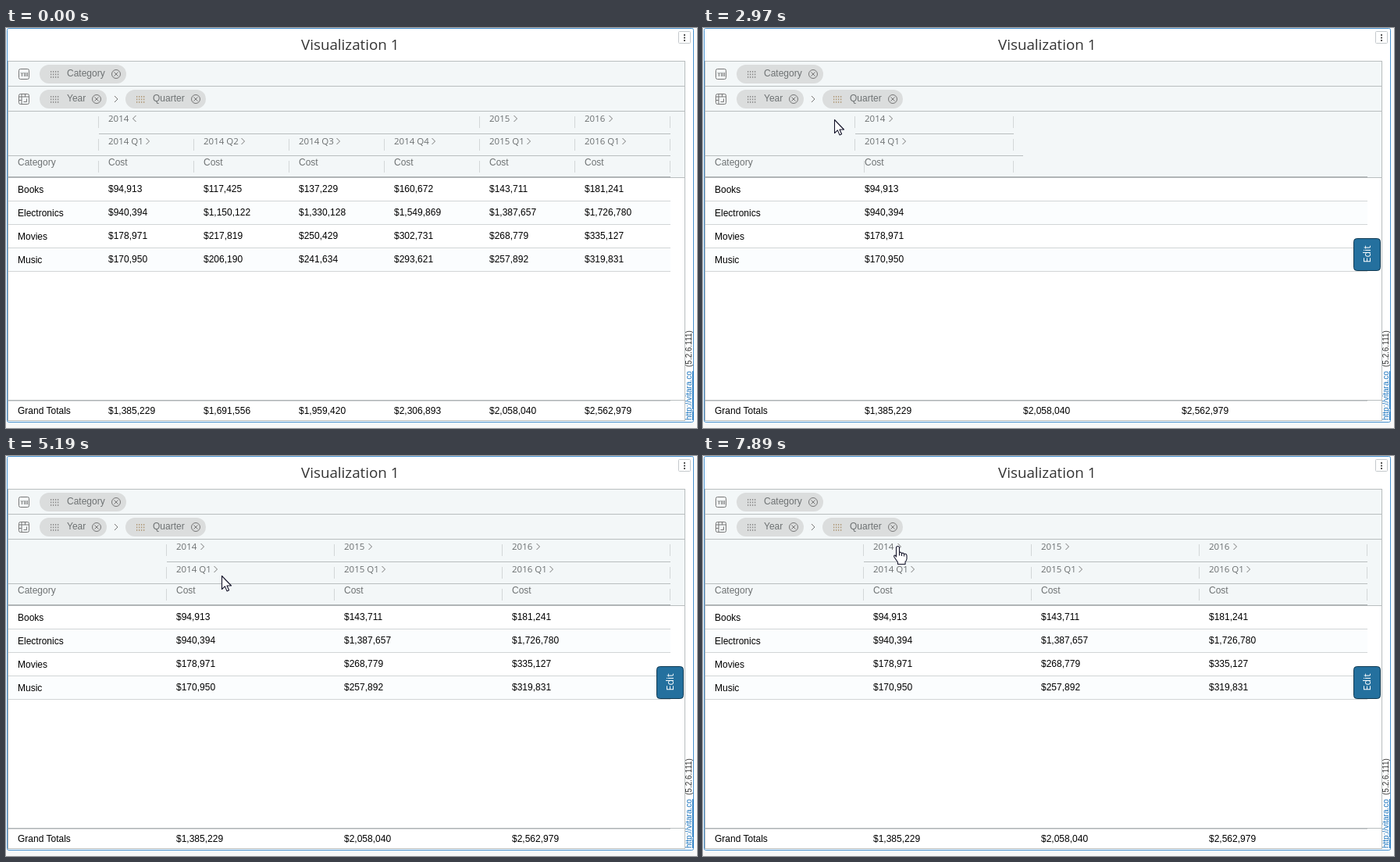
An HTML page for the animation above (8000 ms loop, 885 px wide and 512 px high).

```html
<!DOCTYPE html>
<html lang="en">
<head>
<meta charset="utf-8">
<title>Visualization 1</title>
<style>
html, body { margin: 0; width: 100%; height: 100%; overflow: hidden; background: #fff; }
svg { display: block; width: 100%; height: 100%; }
text { font: 12px "Liberation Sans", Arial, sans-serif; fill: #000; white-space: pre; }
.gray { fill: #6e7273; }
.head { font: 11.5px "Open Sans", sans-serif; fill: #6b6f70; }
.title { font: 18.8px "Open Sans", sans-serif; fill: #333; }
.side { font-size: 10px; fill: #333; }
.edit { font: 12.5px "Open Sans", sans-serif; fill: #fff; }
.ico { fill: none; stroke: #777; }
</style>
</head>
<body>
<svg viewBox="0 0 885 512">
  <defs><clipPath id="view"><path d="M3 107H851V503H3z"/></clipPath></defs>
  <g id="frame"></g>
  <g id="grid" clip-path="url(#view)"></g>
  <g id="edit">
    <rect x="833.5" y="269.5" width="34" height="41" rx="4" fill="#24709e" stroke="#123a52"/>
    <text class="edit" transform="translate(854.5 300.5) rotate(-90)">Edit</text>
  </g>
  <circle id="ring" r="12" fill="#ffdc00" fill-opacity=".47"/>
  <path id="cursor" fill="#fff" stroke="#14142a" stroke-width="1.1" stroke-linejoin="round"/>
</svg>
<script>
const LOOP = 8000;
const LINE = '#b9bebf', STRONG = '#adb2b4';
const ROW_H = 30, BODY = 192, RIGHT = 851;
const $ = id => document.getElementById(id);

const COSTS = {
  'Books': [94913.3, 117425, 137229, 160672, 143711.3, 181241],
  'Electronics': [940394.3, 1150122, 1330128, 1549869, 1387657.3, 1726780],
  'Movies': [178971, 217819, 250429, 302731, 268779, 335127],
  'Music': [170950, 206190, 241634, 293621, 257892, 319831]
};
const NAMES = Object.keys(COSTS);
const money = v => '$' + Math.round(v).toLocaleString('en-US');
const COLS = Array.from({ length: 6 }, (_, i) => {
  const costs = NAMES.map(n => COSTS[n][i]);
  return {
    year: 2014 + Math.max(0, i - 3),
    quarter: i < 4 ? i + 1 : 1,
    costs: costs.map(money),
    total: money(costs.reduce((a, b) => a + b))
  };
});
const FIRSTS = COLS.filter(c => c.quarter === 1);

const text = (x, y, s, cls = '') => `<text x="${x}" y="${y}" class="${cls}">${s}</text>`;
const rect = (x, y, w, h, fill, more = '') =>
  `<rect x="${x}" y="${y}" width="${w}" height="${h}" fill="${fill}" ${more}/>`;
const hline = (x1, x2, y, color = LINE) => rect(x1, y, x2 - x1, 1, color);
const vline = (x, y1, y2, color = LINE) => rect(x, y1, 1, y2 - y1, color);
const tick = (x, y) => vline(x, y, y + 15, '#d3d7d8');
const icon = d => `<path class="ico" d="${d}"/>`;
const chevron = (x, y, dir = 1) => icon(`M${x - 2 * dir} ${y - 4}l${4 * dir} 4l${-4 * dir} 4`);

function chip(x, y, w, label, dotColor = '#8a8a8a') {
  const cx = x + w - 13, cy = y + 12;
  let s = rect(x, y, w, 24, '#dbdddd', 'rx="12"');
  for (let i = 0; i < 12; i++)
    s += rect(x + 14 + i % 4 * 3, y + 8 + (i >> 2) * 3.5, 1.3, 1.8, dotColor);
  return s + text(x + 35, y + 15, label, 'gray') +
    `<circle class="ico" cx="${cx}" cy="${cy}" r="5.5"/>` +
    icon(`M${cx - 2.5} ${cy - 2.5}l5 5m0-5l-5 5`);
}

function drawFrame() {
  let s = rect(0, 505, 885, 7, '#f8f8f8') + rect(881, 0, 4, 512, '#fafafa') +
    rect(1.5, .5, 879, 504, '#fff', 'rx="2" stroke="#4590cf"') +
    rect(3, 43, 866, 148, '#f3f7f8') +
    vline(2, 42, 503, '#a5a9ab') + vline(869, 42, 503);
  for (const y of [42, 74, 106, 191, 476, 502]) s += hline(3, 870, y);
  s += text(378, 28, 'Visualization 1', 'title') +
    rect(861.5, 4.5, 15, 15, '#fff', 'stroke="#c4c9cc" rx="1"');
  for (let i = 0; i < 3; i++) s += rect(868, 8 + i * 3.5, 2, 2, '#555');
  s += chip(43, 47, 111, 'Category') + chip(43, 79, 86, 'Year') +
    chip(153, 79, 103, 'Quarter', '#b09a78') + chevron(141, 91);
  for (const y of [52.5, 84.5])
    s += rect(16.5, y, 13, 13, 'none', 'class="ico" rx="2"');
  s += icon('M19 57l1.5 2 1.5-2m-1.5 2v3M23.5 57v5m2-5v5m2-5v5') +
    icon('M20 84.5v13M16.5 88h13M24.5 84.5V88M16.5 92.5H20M22.5 94.5h4v-4');
  return s + '<g transform="translate(878 502) rotate(-90)">' +
    '<text class="side"><tspan fill="#1b74bd" text-decoration="underline">http://vitara.co</tspan></text>' +
    text(68, 0, '(5.2.6.111)', 'side') + '</g>';
}

// gap: how far the later columns still have to slide, or null at rest
function drawGrid(cols, left, width, open, gap, hover) {
  const moving = gap !== null;
  const totalY = 494;
  let s = text(15, 176, 'Category', 'gray') + text(15, totalY, 'Grand Totals');
  NAMES.forEach((name, i) => {
    const y = BODY + i * ROW_H;
    const fill = i === hover ? '#ebeff0' : i % 2 ? '#fbfdfe' : '#fff';
    s += rect(3, y, RIGHT - 3, ROW_H - 1, fill) +
      hline(3, RIGHT, y + ROW_H - 1, '#d2d5d6') + text(15, y + 19, name);
  });

  cols.forEach((c, i) => {
    const rest = left + i * width;
    const x = rest + (i ? gap || 0 : 0);
    const tx = x + 12;
    if (!open || c.quarter === 1)
      s += text(tx, 120, c.year, 'head') + chevron(tx + 33.5, 116, open && !i ? -1 : 1) + tick(x - 1, 113);
    s += text(tx, 149, `${c.year} Q${c.quarter}`, 'head') + chevron(tx + 50.5, 145) +
      tick(x - 1, 142) + text(tx, 176, 'Cost', 'gray') +
      tick(moving ? x + 11 : x - 1, 170) + text(rest + 12, totalY, c.total);
    c.costs.forEach((v, r) => s += text(tx, BODY + 18 + r * ROW_H, v));
  });

  const split = moving ? left + width : RIGHT;
  const next = split + (gap || 0), end = moving ? next + 2 * width : RIGHT;
  s += hline(left, split, 135) + hline(next, end, 135) +
    hline(3, split + 12, 163) + hline(next, RIGHT, 163);
  for (const y of [113, 142, 170]) s += tick(split - 1, y) + tick(end - 1, y);
  return s + rect(3, 190, RIGHT - 3, 1.5, STRONG) + rect(3, 476, RIGHT - 3, 1.5, STRONG);
}

// cubic-bezier(.25, .1, .25, 1)
function ease(x) {
  let lo = 0, hi = 1, s = .5;
  for (let i = 0; i < 20; i++) {
    s = (lo + hi) / 2;
    if (.75 * s * (1 - s) + s ** 3 < x) lo = s; else hi = s;
  }
  return .3 * s * (1 - s) ** 2 + 3 * s * s * (1 - s) + s ** 3;
}

// pointer moves: start, end, x, y; it rests in between
const MOVES = [
  [720, 860, 558, 440], [1120, 1470, 230, 189], [1470, 1820, 175, 136],
  [2090, 2300, 168, 117], [3580, 4420, 297, 156], [4420, 4770, 228, 155],
  [4770, 5190, 276, 153], [5190, 5610, 621, 164], [5610, 6170, 480, 146],
  [6170, 6520, 211, 110], [6520, 6920, 259, 117], [6920, 7410, 249, 115]
];
const STEP = 70;
const ARROW = 'M0 0V17l3.9-3.6 2.6 6 2.6-1.1-2.6-5.8H12z';
const HAND = 'M-2 2Q-2 0 0 0T2 2V8Q3.5 7 5 9Q7 8 8 10Q11 9 11.5 12V16Q11 19 9.5 20V23H0V20.5' +
  'L-4.5 14Q-5.5 11.5-3.5 11.5L-2 13.5zM2 8V12M5 9V12.5M8 10V13';

function pointer(t) {
  let x = 570, y = 466;
  for (const [a, b, tx, ty] of MOVES) {
    if (t < a) break;
    const held = a + Math.floor((t - a) / STEP) * STEP;
    const k = t >= b ? 1 : (held - a) / (b - a);
    x += (tx - x) * k;
    y += (ty - y) * k;
  }
  return [Math.round(x), Math.round(y)];
}

const within = (t, a, b) => t >= a && t < b;
const show = (id, on) => $(id).setAttribute('visibility', on ? 'visible' : 'hidden');
const move = (id, x, y) => $(id).setAttribute('transform', `translate(${x} ${y})`);
let lastKey = '';

function render(t) {
  const [x, y] = pointer(t);
  const open = t < 2900;
  const row = Math.floor((y + 3 - BODY) / ROW_H);
  const hover = t >= 720 && row < NAMES.length ? row : -1;
  const held = Math.floor((t - 2900) / 67.5) * 67.5;
  const gap = within(t, 2900, 3240) ? Math.round(609 * (1 - ease(held / 400))) : null;
  const key = [open, gap, hover].join();
  if (key !== lastKey) {
    lastKey = key;
    $('grid').innerHTML = open ? drawGrid(COLS, 119, 122, true, gap, hover)
      : gap !== null ? drawGrid(FIRSTS, 195, 203, false, gap, hover)
      : drawGrid(FIRSTS, 206, 215, false, gap, hover);
  }
  show('edit', t >= 720);
  show('cursor', t >= 720);
  show('ring', within(t, 2710, 2900) || within(t, 7700, 7890));
  move('ring', x, y);
  move('cursor', x + .5, y + .5);
  $('cursor').setAttribute('d', within(t, 1260, 2900) || t >= 6920 ? HAND : ARROW);
}

$('frame').innerHTML = drawFrame();
const start = performance.now();
function loop() {
  render((performance.now() - start) % LOOP);
  requestAnimationFrame(loop);
}
loop();
</script>
</body>
</html>
```
